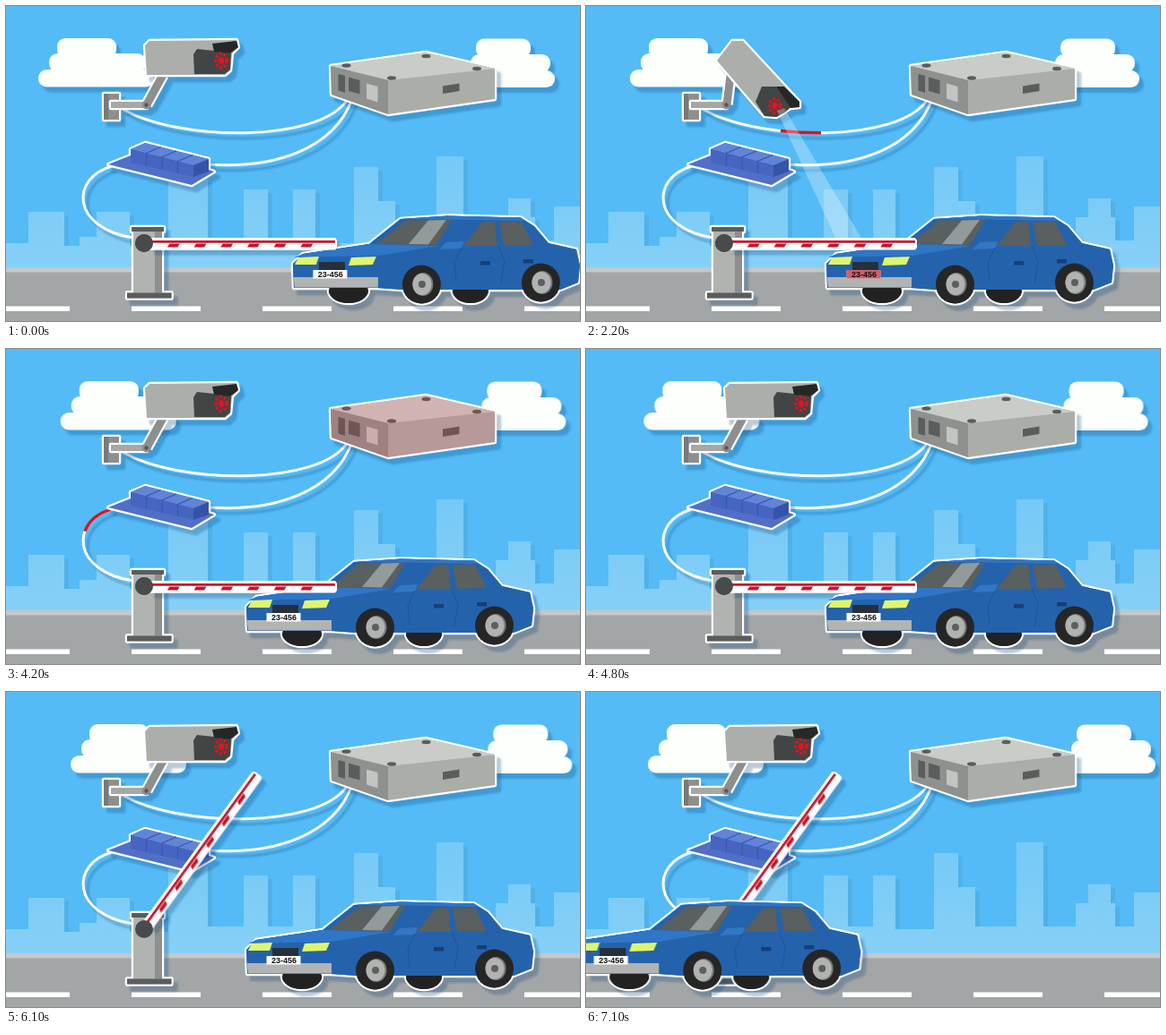
These frames come from a looping animation (640 by 352 pixels, 7.2 s). An HTML page without scripts:

```html
<!DOCTYPE html>
<html lang="en">
<head>
<meta charset="utf-8">
<title>Automatic barrier</title>
<style>
html, body { margin: 0; width: 100%; height: 100%; overflow: hidden; background: #54bbf6; }
svg { display: block; width: 100vw; height: 100vh; }

.shadow { filter: drop-shadow(5px 6px 1.2px rgba(10, 70, 125, .28)); }
.rim { stroke: #fff; stroke-width: 4.4; stroke-linejoin: round; paint-order: stroke; }
.wire { fill: none; stroke: #fff; stroke-width: 3; }
.pulse { fill: none; stroke: #d9141f; stroke-width: 3.4; stroke-dasharray: 17 200; }
.tint { fill: #ff2a32; opacity: 0; }

.cloud-l { animation: cloud-l 7.2s linear infinite; }
.cloud-r { animation: cloud-r 7.2s linear infinite; }
@keyframes cloud-l {
  0% { transform: none; }
  84.7% { transform: translateX(36px); }
  89% { transform: translateX(37px); }
  98.6%, 100% { transform: translateX(33px); }
}
@keyframes cloud-r {
  0% { transform: none; }
  15.3% { transform: translateX(1px); }
  100% { transform: translateX(23.3px); }
}

/* camera head: every part morphs from level to tilted */
.body {
  --level: path("M155 44L160 39L257 38L259 46L252 53L250 72L244 77L157 77Z");
  --tilted: path("M163 39L175 39L238 107L238 113L228 114L213 124L199 123L146 61Z");
}
.lens {
  --level: path("M209 54L213 48L232 50L251 53L250 71L244 76L210 76Z");
  --tilted: path("M189 107L196 90L212 90L228 113L222 119L212 124L199 123Z");
}
.visor {
  --level: path("M230 42L257 39L259 46L250 53L232 51Z");
  --tilted: path("M221 90L238 107L238 113L228 114L212 90Z");
}
.strut {
  --level: path("M157 110L175 77");
  --tilted: path("M157 110L161 78");
  fill: none; stroke: #8c8f8d; stroke-width: 9;
}
.body, .lens, .visor, .strut { d: var(--level); animation: tilt 7.2s infinite; }
.strut.edge { stroke: #fff; stroke-width: 13.4; }
@keyframes tilt {
  0%, 5%, 46%, 100% { d: var(--level); animation-timing-function: ease-in-out; }
  13%, 37% { d: var(--tilted); animation-timing-function: ease-in-out; }
}
.eye { animation: eye 7.2s infinite; }
@keyframes eye {
  0%, 5%, 46%, 100% { transform: none; animation-timing-function: ease-in-out; }
  13%, 37% { transform: translate(-29.5px, 50.5px); animation-timing-function: ease-in-out; }
}
.body.tint { animation: tilt 7.2s infinite, alarm 7.2s linear infinite; }
@keyframes alarm {
  0%, 11.5% { opacity: 0; }
  14%, 16% { opacity: .42; }
  23%, 100% { opacity: 0; }
}

.beam { fill: #fff; animation: beam 7.2s linear infinite; }
@keyframes beam {
  0%, 13.2% { d: path("M213 117L221 114L221 114L213 117Z"); opacity: .28; }
  15.3% { d: path("M213 117L221 114L250 168L241 172Z"); opacity: .28; }
  22%, 32% { d: path("M213 117L221 114L317 276L286 276Z"); opacity: .28; }
  35%, 100% { d: path("M213 117L221 114L317 276L286 276Z"); opacity: 0; }
}
.plate-tint { fill: #c02836; opacity: 0; animation: plate 7.2s linear infinite; }
@keyframes plate {
  0%, 22% { opacity: 0; }
  25%, 32% { opacity: .74; }
  36%, 100% { opacity: 0; }
}

.pulse1 { animation: pulse1 7.2s linear infinite; }
.pulse2 { animation: pulse2 7.2s linear infinite; }
.pulse3 { animation: pulse3 7.2s linear infinite; stroke-dasharray: 30 200; }
@keyframes pulse1 { 0%, 25.7% { stroke-dashoffset: 17; } 36.8%, 100% { stroke-dashoffset: -100; } }
@keyframes pulse2 { 0%, 46% { stroke-dashoffset: 17; } 55.5%, 100% { stroke-dashoffset: -100; } }
@keyframes pulse3 { 0%, 56.5% { stroke-dashoffset: 30; } 64.2%, 100% { stroke-dashoffset: -100; } }

.box-tint { animation: box 7.2s linear infinite; }
@keyframes box {
  0%, 37% { opacity: 0; }
  42%, 58.3% { opacity: .15; }
  65%, 100% { opacity: 0; }
}

.arm { transform-origin: 154px 265px; animation: lift 7.2s infinite; }
@keyframes lift {
  0%, 66.7% { transform: none; animation-timing-function: ease-in-out; }
  82%, 100% { transform: rotate(-54deg); }
}
/* once raised, the arm passes behind the car */
.front { animation: front 7.2s step-end infinite; }
@keyframes front { 0% { visibility: visible; } 84%, 100% { visibility: hidden; } }

.car { animation: drive 7.2s linear infinite; }
@keyframes drive {
  0% { transform: translateX(52px); animation-timing-function: cubic-bezier(.2, .5, .5, 1); }
  14%, 86% { transform: none; animation-timing-function: cubic-bezier(.45, 0, .8, .65); }
  98.6% { transform: translateX(-281px); }
  100% { transform: translateX(-322px); }
}
.plate { font: bold 9px "Liberation Sans", Arial, sans-serif; text-anchor: middle; fill: #111; }
</style>
</head>
<body>
<svg viewBox="0 0 640 352" preserveAspectRatio="none">
<defs>
  <linearGradient id="haze" x1="0" y1="0" x2="0" y2="1">
    <stop offset="0" stop-color="#76c9f6"/>
    <stop offset="1" stop-color="#86d0f7"/>
  </linearGradient>
  <g id="bar">
    <path fill="#fff" d="M160 259H367L369 262V270L367 272.500H160Z"/>
    <path fill="#c8142a" d="M163 262H367V264.800H163Z"/>
    <path transform="translate(154) skewX(-30)" stroke="#c8142a" stroke-width="4" stroke-dasharray="11.5 18.2" d="M181.500 267.500H342"/>
  </g>
  <g id="wheel">
    <ellipse cx="-1.500" rx="21.500" ry="21.500" fill="#262627"/>
    <ellipse rx="11.500" ry="13" fill="#777a79"/>
    <ellipse cx="-1" rx="10.500" ry="12" fill="#b0b3b0"/>
    <circle cx="-1" r="4" fill="#5c5f5e"/>
  </g>
  <g id="far-wheels" fill="#222223">
    <ellipse cx="330" cy="318" rx="22" ry="14"/>
    <ellipse cx="466" cy="318" rx="20" ry="14"/>
  </g>
  <path id="shell" fill="#2463ab" d="M268 288L279 277L353 266L388 238L440 234.500L522 236.500L537 246L553 265L584 272L588 290L586 309L566 317H390L362 315H269Z"/>
</defs>

<rect width="640" height="352" fill="#54bbf6"/>
<path fill="url(#haze)" style="filter:drop-shadow(5px 4px 0 #50b1e8)" d="M0 265H25V230H65V268H82V258H101V230H138V268H181V192H225V262H265V205H292V262H320V205H345V265H388V180H415V218H434V262H480V168H510V262H546V236H560V215H585V236H590V262H611V224H640V294H0Z"/>

<rect y="292" width="640" height="60" fill="#a3a6a6"/>
<rect y="292" width="640" height="5.500" fill="#c4c8c9"/>
<path stroke="#fff" stroke-width="5.600" stroke-dasharray="77 69" d="M-6 338.300H640"/>

<g class="shadow" fill="#fcfffb">
  <g class="cloud-l">
    <rect x="57" y="36" width="66" height="22" rx="9"/>
    <rect x="48" y="53" width="108" height="21" rx="9.500"/>
    <rect x="36" y="71" width="129" height="19.500" rx="9.500"/>
  </g>
  <g class="cloud-r">
    <rect x="524" y="36.500" width="61" height="21" rx="9"/>
    <rect x="518" y="54" width="89" height="20" rx="9.500"/>
    <rect x="505" y="72" width="107" height="19" rx="9.500"/>
  </g>
</g>

<g class="shadow">
  <path class="wire" d="M130 115C190 151 350 154 381 104"/>
  <path class="wire" d="M226 177C300 182 365 160 386 104"/>
  <path class="wire" d="M118 179C72 192 72 248 142 259"/>
</g>
<path class="pulse pulse1" pathLength="100" d="M130 115C190 151 350 154 381 104"/>
<path class="pulse pulse2" pathLength="100" d="M386 104C365 160 300 182 226 177"/>
<path class="pulse pulse3" pathLength="100" d="M118 179C72 192 72 248 142 259"/>

<!-- controller -->
<g class="shadow">
  <path class="rim" fill="#abada9" d="M362 67L468 52L545 70V104L426 121L363 99Z"/>
  <path fill="#caccc8" d="M362 67L468 52L545 70L426 83Z"/>
  <path fill="#8e918e" d="M362 67L426 83V121L363 99Z"/>
  <g fill="#5a5d5c">
    <ellipse cx="379.500" cy="66.500" rx="5" ry="2.200"/>
    <ellipse cx="430" cy="80.500" rx="5" ry="2.200"/>
    <ellipse cx="468.500" cy="56" rx="5" ry="2.200"/>
    <ellipse cx="525" cy="70" rx="5" ry="2.200"/>
    <path d="M370.500 76L378 78V97L370.500 94.500ZM382 79.500L394.500 83V98.500L382 95ZM487 89.500L505.500 86.500V95L487 98Z"/>
  </g>
  <path fill="#c3c5c2" d="M402 86.500L414.500 90V107.500L402 103.500Z"/>
  <path class="tint box-tint" d="M362 67L468 52L545 70V104L426 121L363 99Z"/>
</g>

<!-- relay strip -->
<g class="shadow">
  <path class="rim" fill="#506fc6" d="M114 177L139 167V160L155 153L226 171V183L232 185L207 200Z"/>
  <path fill="#6084d8" d="M139 160L155 153L226 171L209 178Z"/>
  <path fill="#4565c0" d="M139 160L209 178V191L139 175Z"/>
  <path fill="#3653aa" d="M209 178L226 171V185L209 191Z"/>
  <path fill="none" stroke="#3857b0" stroke-width="1.200" d="M156.500 179V164.500L172.500 157.500M174 183V169L190 162M191.500 187V173.500L208 166.500"/>
</g>

<!-- camera -->
<g class="shadow">
  <path class="rim" fill="#8c8f8d" d="M109 98H126V127H109Z"/>
  <path class="strut edge"/>
  <path class="rim" fill="#a5a8a5" d="M117 107H157V114H117Z"/>
  <path class="strut"/>
  <circle cx="156.500" cy="110.500" r="5" fill="#8c8f8d"/>
  <circle cx="156.500" cy="110.500" r="2.200" fill="#555857"/>
  <path fill="#777a78" d="M109 98H114V127H109Z"/>
  <path class="body rim" fill="#abaeaa"/>
  <path class="lens" fill="#424545"/>
  <path class="visor" fill="#262828"/>
  <path class="body tint"/>
  <g class="eye">
    <ellipse cx="240" cy="61" rx="6" ry="7.800" fill="none" stroke="#e8101c" stroke-width="3.600" stroke-dasharray="2.800 2.200"/>
    <ellipse cx="240" cy="61" rx="3" ry="4" fill="#e8101c"/>
  </g>
</g>
<path class="beam"/>

<!-- barrier -->
<g class="shadow">
  <path class="rim" fill="#b0b3b0" d="M140 247H176V252H174V320.500H184.500V326.500H135V320.500H142V252H140Z"/>
  <path fill="#8d908e" d="M166 252H174V320.500H166Z"/>
  <path fill="#5a5d5c" d="M140 247H176V252H140ZM135 320.500H184.500V326.500H135Z"/>
</g>
<g class="shadow"><g class="arm"><use href="#bar"/></g></g>
<circle cx="154" cy="265" r="10" fill="#484b4b"/>

<!-- car -->
<g class="shadow"><g class="car">
  <g class="rim">
    <use href="#far-wheels"/>
    <use href="#wheel" x="413" y="311"/>
    <use href="#wheel" x="546" y="309"/>
    <use href="#shell"/>
  </g>
  <use href="#far-wheels"/>
  <use href="#shell"/>
  <path fill="#2f76c6" d="M279 277L353 266L430 268L364 279L270 281Z"/>
  <path fill="#2f76c6" d="M388 238L440 234.500L522 236.500L526 240L448 238.500Z"/>
  <path fill="#5a5f5f" d="M361 266L394 239.500L445 239L428 267ZM458 268L479 241.500L493 241L496 268ZM498 241.500L523 241L536 267L503 268Z"/>
  <path fill="#939a9a" d="M397 266L419 239.500L439 239L419 266.500Z"/>
  <path fill="#3277c5" d="M431 272L439 264L459 263L456 271Z"/>
  <path fill="none" stroke="#1d5394" stroke-width="1" d="M456 270L448 287L450 308M497 268L504 285L500 310"/>
  <path fill="#173f78" d="M477 285H488V289.500H477ZM525 283H536V287.500H525Z"/>
  <path fill="#dff56e" d="M274 281L297 280L294 289H270ZM333 281L361 280L357 289L330 290Z"/>
  <path fill="#26303b" d="M297 286H326V295H297Z"/>
  <path fill="#b1b4b2" d="M268.500 303H363V314.500H270Z"/>
  <rect x="290.500" y="295" width="38" height="9.500" fill="#fff"/>
  <rect class="plate-tint" x="290.500" y="295" width="38" height="9.500"/>
  <text class="plate" x="310" y="303">23-456</text>
  <use href="#wheel" x="413" y="311"/>
  <use href="#wheel" x="546" y="309"/>
</g></g>

<g class="front"><g class="arm"><use href="#bar"/></g></g>
<circle class="front" cx="154" cy="265" r="10" fill="#484b4b"/>
</svg>
</body>
</html>
```
